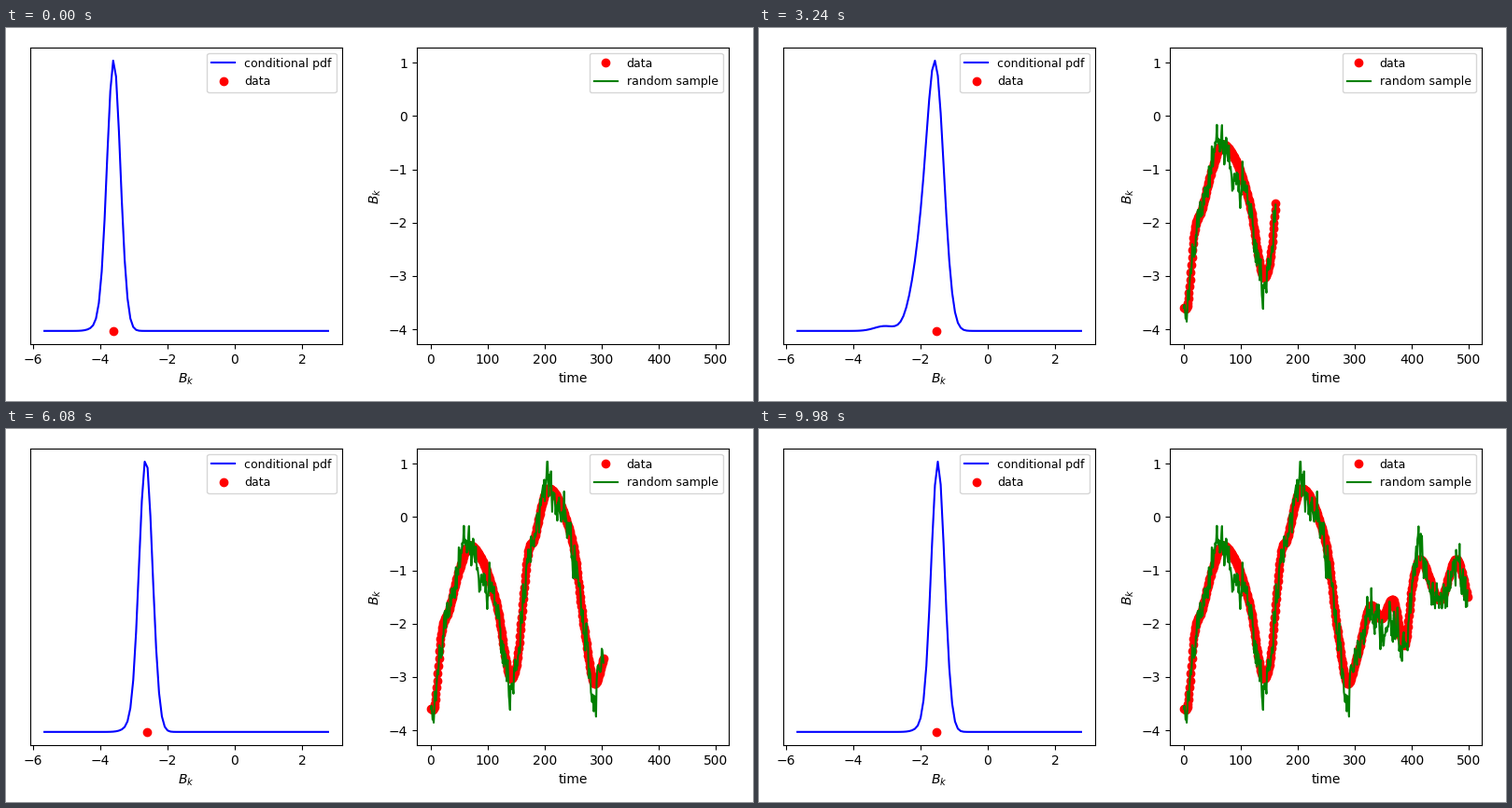
A matplotlib script that plays this animation: 800 by 400 pixels, repeating every 10 s.

```python
import numpy as np
import matplotlib.pyplot as plt
from matplotlib.animation import FuncAnimation

N = 500
PHI, SIGMA = 0.4, 0.2
Y_MIN, Y_MAX = -4.03, 1.04

# Key points (time, value) of the smooth data curve
KEYS = [(0, -3.6), (6, -3.56), (18, -2.2), (31, -1.76), (50, -.98),
        (68, -.53), (90, -.81), (116, -1.67), (141, -3.03), (152, -2.63),
        (162, -1.53), (171, -.64), (181, -.42), (196, .28), (206, .54),
        (236, -.01), (252, -.66), (268, -2), (288, -3.12), (304, -2.61),
        (329, -1.66), (346, -1.9), (366, -1.55), (387, -2.4), (402, -1.2),
        (414, -.79), (449, -1.55), (478, -.79), (499, -1.53)]

# Spells in which the sample strays from the data: time, width, height
SPELLS = [(28, 4, .25), (58, 7, .2), (88, 7, -.5), (138, 2, -.45),
          (209, 3, .25), (286, 3, -.6), (358, 16, -.4), (411, 5, .3)]


def bell(x, centre, width):
    return np.exp(-0.5 * ((x - centre) / width) ** 2)


def smooth_curve(x, keys):
    """Cubic Hermite curve, level at its turning points."""
    t, v = np.array(keys, float).T
    slope = np.gradient(v, t)
    step = np.diff(v)
    slope[1:-1][step[:-1] * step[1:] < 0] = 0
    i = np.clip(np.searchsorted(t, x, side="right") - 1, 0, len(t) - 2)
    h = t[i + 1] - t[i]
    s = (x - t[i]) / h
    ease = s * s * (3 - 2 * s)
    return (v[i] + step[i] * ease + s * (1 - s) ** 2 * h * slope[i]
            + s * s * (s - 1) * h * slope[i + 1])


def walk(rng):
    """Autoregressive noise: its expected and its drawn values."""
    shocks = SIGMA * np.clip(rng.normal(size=N), -2, 2)
    drawn = np.zeros(N)
    for k in range(N):
        drawn[k] = PHI * drawn[k - 1] + shocks[k]
    return drawn - shocks, drawn


time = np.arange(N)
grid = np.linspace(-5.66, 2.777, 100)
data = smooth_curve(time, KEYS)
drift = sum(height * bell(time, t, width) for t, width, height in SPELLS)
expected, drawn = walk(np.random.default_rng(7))
centre = data + drift + expected
sample = np.clip(data + drift + drawn, Y_MIN, Y_MAX)

# The density widens on fast rises and leans left where the sample lags
rise = np.clip((np.gradient(data) - 0.06) / 0.04, 0, 1)
lean = 0.015 + 0.1 * np.maximum(-drift, 0)


def pdf(k):
    c, w = centre[k], rise[k]
    p = (bell(grid, c, SIGMA + 0.05 * w)
         + lean[k] * bell(grid, c - 0.45, 0.22)
         + 0.3 * w * bell(grid, c - 0.42, 0.3)
         + 0.02 * w * bell(grid, c - 1.53, 0.3))
    return p / p.max()


def pad_limits(lo, hi):
    pad = 0.05 * (hi - lo)
    return lo - pad, hi + pad


fig, (left, right) = plt.subplots(1, 2, figsize=(8, 4), dpi=100)
left.set_xlabel(r"$B_k$")
left.set_yticks([])
right.set_xlabel("time")
right.set_ylabel(r"$B_k$")
fig.tight_layout()  # laid out before the limits are set

pdf_line, = left.plot([], [], "b-", label="conditional pdf")
dot, = left.plot([], [], "ro", label="data")
data_dots, = right.plot([], [], "ro", label="data")
sample_line, = right.plot([], [], "g-", label="random sample")

left.set_xticks(range(-6, 3, 2))
left.set_xlim(pad_limits(grid[0], grid[-1]))
left.set_ylim(pad_limits(0, 1))
right.set_xticks(range(0, 501, 100))
right.set_yticks(range(-4, 2))
right.set_xlim(pad_limits(0, N - 2))
right.set_ylim(pad_limits(Y_MIN, Y_MAX))
for ax in (left, right):
    ax.legend(loc="upper right", fontsize=9)


def update(k):
    pdf_line.set_data(grid, pdf(k))
    dot.set_data([data[k]], [0])
    data_dots.set_data(time[:k], data[:k])
    sample_line.set_data(time[:k], sample[:k])
    return pdf_line, dot, data_dots, sample_line


anim = FuncAnimation(fig, update, frames=N, interval=20, repeat=True,
                     repeat_delay=0, cache_frame_data=False)
plt.show()
```
